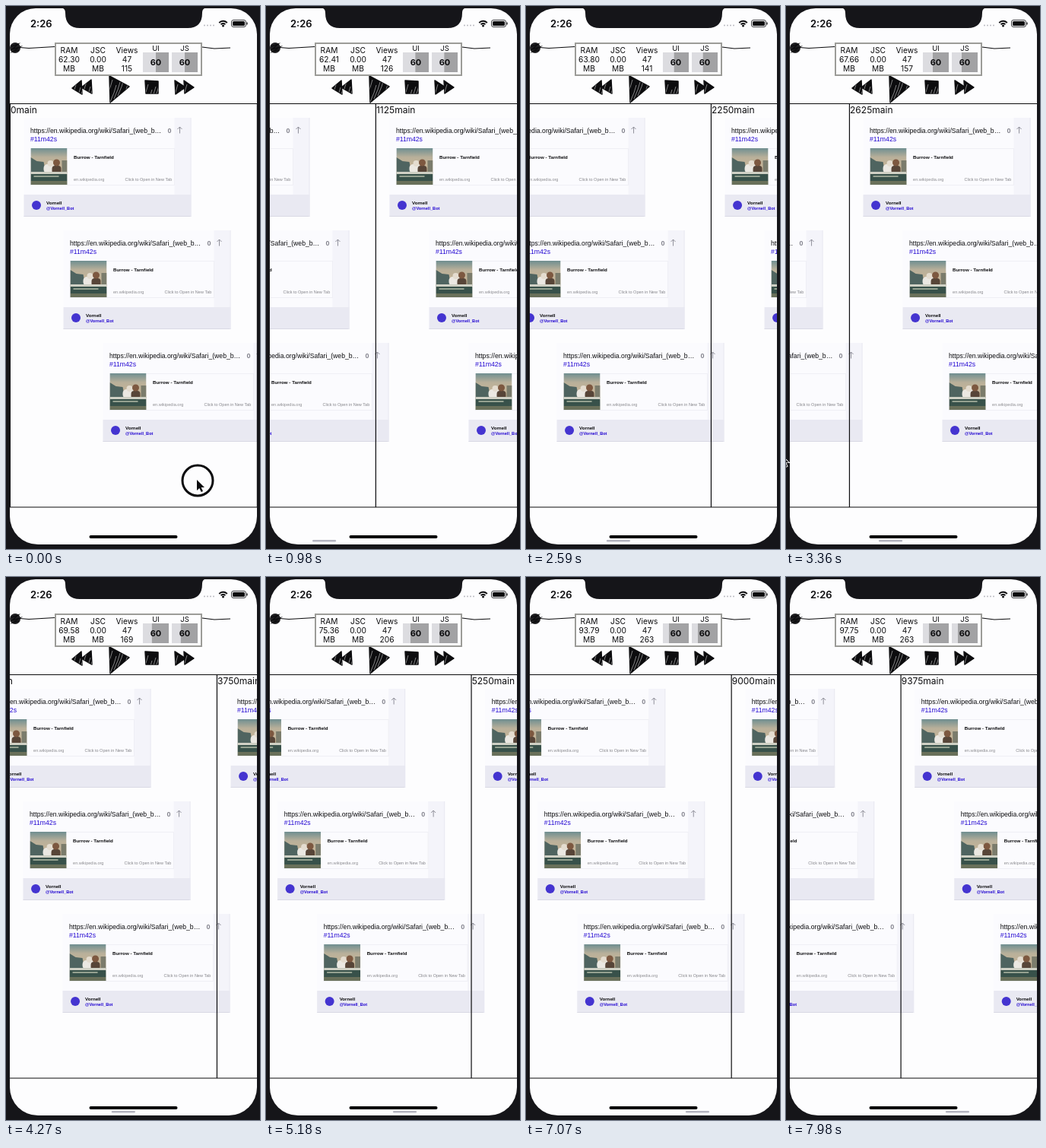
An HTML page with a canvas that plays this animation: 334 by 714 pixels, repeating every 8 s.

```html
<!DOCTYPE html>
<html lang="en">
<head>
<meta charset="utf-8">
<title>Timeline scroller</title>
<style>
html, body { margin: 0; width: 100%; height: 100%; overflow: hidden; background: #151519; }
canvas { display: block; width: 334px; height: 714px; }
</style>
</head>
<body>
<canvas id="stage"></canvas>
<script>
const W = 334, H = 714, LOOP = 8000;
const INK = '#0c0c0e', PAPER = '#fdfdfe', BEZEL = '#151519', LINK = '#2408d2';
const UI = 'Inter, sans-serif', SANS = '"Liberation Sans", Arial, sans-serif';
const PAGE = 325, LEFT = 5, DECAY = 982;

const canvas = document.getElementById('stage');
const ctx = canvas.getContext('2d');
const dpr = window.devicePixelRatio || 1;
canvas.width = W * dpr;
canvas.height = H * dpr;

// A touch halts the content, drags it with rising speed and lets it coast.
// The coasting distance follows from one position reached later.
const swipes = [
  { touch: 70, release: 470, drag: 250, from: 251, at: 1890, pos: 1354.3 },
  { touch: 1950, release: 2480, drag: 250, from: 251, at: 3000, pos: 1961 },
  { touch: 3000, release: 3340, drag: 208, from: 228, at: 4420, pos: 3050 },
  { touch: 4420, release: 4640, drag: 250, from: 251, at: 5180, pos: 4284 },
  { touch: 5320, release: 5500, drag: 168, from: 228, at: 7070, pos: 7534.5 }
];
const coast = u => 1 - Math.exp(-u / DECAY);
const dragged = (s, t) => s.drag * ((t - s.touch) / (s.release - s.touch)) ** 2;

function position(s, t) {
  if (t < s.release) return s.base + dragged(s, t);
  return s.base + s.drag + s.reach * coast(t - s.release);
}
swipes.forEach((s, i) => {
  s.base = i ? position(swipes[i - 1], s.touch) : 0;
  s.reach = (s.pos - s.base - s.drag) / coast(s.at - s.release);
});
const swipeAt = t => swipes.filter(s => t >= s.touch).pop();
function scrollAt(t) {
  const s = swipeAt(t);
  return s ? position(s, t) : 0;
}

// time, memory, views, scroll thumb x, graph fill
const stats = [
  [0, 62.30, 115, 8, 17], [1890, 62.52, 136, 94, 18], [3360, 67.66, 157, 122, 21],
  [5180, 75.36, 206, 167, 24], [6020, 85.26, 227, 196, 25],
  [7070, 93.79, 263, 210, 26], [7980, 97.75, 263, 210, 26], [8000, 97.75, 263, 210, 26]
];
function statsAt(t) {
  let i = 0;
  while (i < stats.length - 2 && t >= stats[i + 1][0]) i++;
  const a = stats[i], b = stats[i + 1], start = scrollAt(a[0]);
  const u = (scrollAt(t) - start) / (scrollAt(b[0]) - start);
  const step = Math.floor(u * 4 + 1e-6) / 4;
  const mix = (k, f) => a[k] + (b[k] - a[k]) * f;
  return { ram: mix(1, step).toFixed(2), views: Math.round(mix(2, step)), thumb: mix(3, u), fill: mix(4, u) };
}

function rect(x, y, w, h, color) {
  ctx.fillStyle = color;
  ctx.fillRect(x, y, w, h);
}
function round(x, y, w, h, r, color) {
  ctx.fillStyle = color;
  ctx.beginPath();
  ctx.roundRect(x, y, w, h, r);
  ctx.fill();
}
function disc(x, y, r, color) {
  ctx.fillStyle = color;
  ctx.beginPath();
  ctx.arc(x, y, r, 0, Math.PI * 2);
  ctx.fill();
}
function text(s, x, y, font, color = INK, align = 'left') {
  ctx.font = font;
  ctx.fillStyle = color;
  ctx.textAlign = align;
  ctx.fillText(s, x, y);
}
function path(points, closed) {
  ctx.beginPath();
  points.forEach(([x, y], i) => i ? ctx.lineTo(x, y) : ctx.moveTo(x, y));
  if (closed) ctx.closePath();
}
function line(points, color = INK, width = 1) {
  path(points);
  ctx.strokeStyle = color;
  ctx.lineWidth = width;
  ctx.stroke();
}

function photo(x, y) {
  ctx.save();
  ctx.beginPath();
  ctx.rect(x, y, 48, 48);
  ctx.clip();
  const sky = ctx.createLinearGradient(0, y, 0, y + 48);
  sky.addColorStop(0, '#6f8e90');
  sky.addColorStop(0.25, '#b9b09a');
  sky.addColorStop(0.6, '#c9b596');
  sky.addColorStop(1, '#64705e');
  rect(x, y, 48, 48, sky);
  ctx.fillStyle = '#4f6460';
  path([[x, y + 12], [x + 8, y + 17], [x + 17, y + 18], [x + 20, y + 33], [x, y + 34]], true);
  ctx.fill();
  rect(x + 41, y + 16, 7, 17, '#7b7c6c');
  round(x + 17, y + 21, 16, 12, 5, '#ebe8e2');
  round(x + 28, y + 23, 12, 11, 4, '#574538');
  disc(x + 26, y + 20, 4, '#e4dccf');
  disc(x + 34, y + 19, 4.5, '#7d5840');
  rect(x, y + 31, 48, 3, '#cfd0c4');
  rect(x, y + 34, 48, 9, '#38514a');
  rect(x + 4, y + 36, 33, 2, '#94a190');
  rect(x, y + 43, 48, 5, '#69705a');
  ctx.restore();
}

function card(x, y) {
  rect(x, y, 220, 130, '#fbfbfe');
  rect(x + 198, y, 22, 101, '#f4f4fa');
  rect(x, y + 101, 220, 29, '#e9e9f2');
  rect(x, y + 129, 220, 1, '#d9d9e4');
  rect(x + 219, y, 1, 130, '#e9e9f1');
  ctx.strokeStyle = '#efeff5';
  ctx.lineWidth = 1;
  ctx.strokeRect(x + 9, y + 40.5, 189, 48);
  const body = `8.67px ${SANS}`, bold = `bold 6.2px ${SANS}`, small = `5.5px ${SANS}`;
  text('https://en.wikipedia.org/wiki/Safari_(web_b…', x + 8.5, y + 20, body);
  text('#11m42s', x + 8.5, y + 31, body, LINK);
  text('0', x + 191.5, y + 20, `bold 9px ${SANS}`, '#85858f', 'center');
  const ax = x + 205;
  line([[ax, y + 20.5], [ax, y + 12]], '#85858f', 0.9);
  line([[ax - 3, y + 15], [ax, y + 12], [ax + 3, y + 15]], '#85858f', 0.9);
  photo(x + 9, y + 40);
  text('Burrow - Tarnfield', x + 65.5, y + 54, bold);
  text('en.wikipedia.org', x + 65.5, y + 82.5, `5.6px ${SANS}`, '#8d8d91');
  text('Click to Open in New Tab', x + 133, y + 82.5, small, '#85858a');
  disc(x + 16.5, y + 115, 6, '#4434d0');
  text('Vornell', x + 29.5, y + 114, bold);
  text('@Vornell_Bot', x + 29.5, y + 120.5, `bold 5.6px ${SANS}`, LINK);
}

function pages(scroll) {
  const first = Math.max(0, Math.floor(scroll / PAGE) - 1);
  const visible = [0, 1, 2].map(k => first + k);
  const left = i => LEFT + i * PAGE - scroll;
  ctx.save();
  ctx.beginPath();
  ctx.rect(LEFT, 128, PAGE, 532);
  ctx.clip();
  for (const i of visible)
    for (let k = 0; k < 3; k++) card(left(i) + 18.5 + 52 * k, 147 + 148 * k);
  for (const i of visible) {
    rect(left(i) - 0.2, 128, 1.2, 531, INK);
    text(i * 375 + 'main', left(i) + 1, 140.5, `12px ${UI}`);
  }
  ctx.restore();
  rect(LEFT, 128, PAGE, 1, INK);
  rect(LEFT, 658.5, PAGE, 1, INK);
}

// Inked shape with rough edges and a few gaps in the hatching
function scribble(points) {
  ctx.save();
  path(points, true);
  ctx.fillStyle = INK;
  ctx.strokeStyle = INK;
  ctx.lineWidth = 1.5;
  ctx.lineJoin = 'round';
  ctx.fill();
  ctx.stroke();
  ctx.clip();
  const [x, y] = points[0];
  for (let k = 0; k < 9; k++) {
    const px = x - 14 + k * 5, py = y + (k * 7) % 11;
    line([[px, py + 24], [px + 5, py + 12], [px + 8, py + 2]], '#b4b4b4', 0.7);
  }
  ctx.restore();
}

function transport() {
  line([[12, 54], [30, 55.5], [64, 53.5]], INK, 1.1);
  line([[258, 54], [274, 56], [295, 55]], INK, 1.1);
  disc(12, 55, 7, '#202022');
  line([[7, 53], [16, 50], [8, 57], [18, 54], [9, 60], [17, 58]], INK, 1.4);
  scribble([[99, 98], [100, 116], [87, 108]]);
  scribble([[112, 97], [113, 115], [99, 107]]);
  scribble([[136, 92], [137, 127], [162, 106]]);
  scribble([[183, 98], [200, 99], [200, 115], [184, 115]]);
  scribble([[222, 98], [223, 116], [236, 107]]);
  scribble([[234, 98], [235, 115], [247, 107]]);
}

function monitor(s) {
  rect(64, 48, 194, 44, '#9c9c98');
  rect(66, 50, 190, 40, PAPER);
  const column = (rows, x) =>
    rows.forEach((r, i) => text(r, x, 62 + 12 * i, `10.2px ${UI}`, INK, 'center'));
  column(['RAM', s.ram, 'MB'], 83);
  column(['JSC', '0.00', 'MB'], 121);
  column(['Views', '47', s.views], 159);
  [['UI', 180], ['JS', 218]].forEach(([name, x]) => {
    text(name, x + 17, 59, `9.5px ${UI}`, INK, 'center');
    rect(x, 61, 34, 26, '#dcdce0');
    rect(x + 34 - s.fill, 61, s.fill, 26, '#a2a2a4');
    text('60', x + 17, 78, `bold 11px ${UI}`, INK, 'center');
  });
}

function statusBar() {
  text('2:26', 32, 28, `600 13px ${UI}`);
  for (let k = 0; k < 4; k++) disc(261 + k * 4, 25.5, 0.9, '#b4b4ba');
  ctx.strokeStyle = INK;
  ctx.lineWidth = 1.9;
  [4, 7.2].forEach(r => {
    ctx.beginPath();
    ctx.arc(285.5, 27, r, -Math.PI * 0.76, -Math.PI * 0.24);
    ctx.stroke();
  });
  disc(285.5, 26, 1.5, INK);
  ctx.lineWidth = 0.8;
  ctx.beginPath();
  ctx.roundRect(296.5, 18.5, 19, 9, 2.5);
  ctx.stroke();
  round(298, 20, 16, 6, 1.5, INK);
  rect(316.5, 21.5, 1.2, 3, INK);
}

function screenShape() {
  ctx.beginPath();
  ctx.roundRect(5, 3, 325, 705, [34, 34, 37, 37]);
}
function notch() {
  ctx.fillStyle = BEZEL;
  ctx.beginPath();
  ctx.moveTo(72, 2);
  ctx.quadraticCurveTo(78, 3, 78, 9);
  ctx.quadraticCurveTo(78, 29, 97, 29);
  ctx.lineTo(239, 29);
  ctx.quadraticCurveTo(258, 29, 258, 9);
  ctx.quadraticCurveTo(258, 3, 264, 2);
  ctx.fill();
}

function arrow(x, y) {
  path([[0, 0], [0, 14], [3.3, 11], [5.7, 16], [8, 15], [5.6, 10], [10, 10]].map(([a, b]) => [x + a, y + b]), true);
  ctx.strokeStyle = PAPER;
  ctx.lineWidth = 1.8;
  ctx.stroke();
  ctx.fillStyle = INK;
  ctx.fill();
}
// Follows the drag, then slides on past the left edge
function pointer(t) {
  const s = swipeAt(t) || swipes[0];
  const moved = dragged(s, Math.max(t, s.touch));
  const x = s.from - moved, y = 623 - moved * 0.14;
  if (x < -30) return;
  if (t < s.release) {
    ctx.strokeStyle = INK;
    ctx.lineWidth = 3;
    ctx.beginPath();
    ctx.arc(x + 1, y + 1, 20, 0, Math.PI * 2);
    ctx.stroke();
  }
  arrow(x, y);
}

function draw(t) {
  const s = statsAt(t);
  ctx.setTransform(dpr, 0, 0, dpr, 0, 0);
  rect(0, 0, W, H, BEZEL);
  ctx.save();
  screenShape();
  ctx.clip();
  rect(0, 0, W, H, PAPER);
  pages(scrollAt(t));
  transport();
  monitor(s);
  statusBar();
  notch();
  round(109.5, 696, 116, 4, 2, '#000');
  if (t >= swipes[0].touch) round(s.thumb, 702, 31, 2.5, 1.25, '#b4b4c0');
  ctx.restore();
  pointer(t);
}

const begin = performance.now();
function tick() {
  draw((performance.now() - begin) % LOOP);
  requestAnimationFrame(tick);
}
tick();
</script>
</body>
</html>
```
